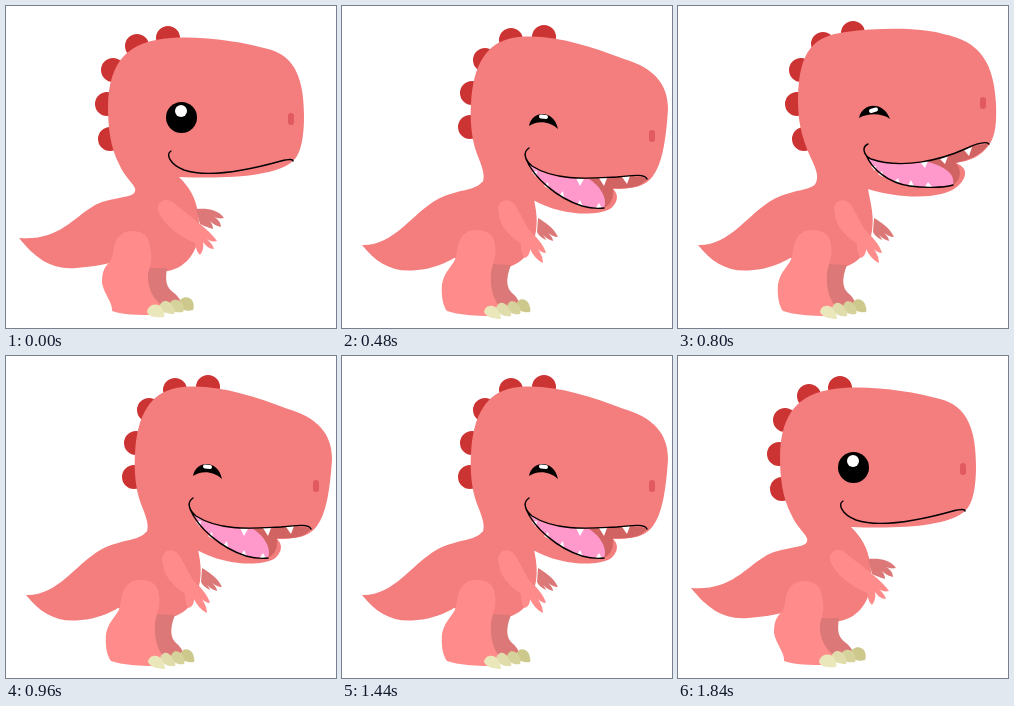
An HTML page that plays this animation: 330x322 px, repeating every 2 s.

```html
<!DOCTYPE html>
<html lang="en">
<head>
<meta charset="utf-8">
<title>Laughing dinosaur</title>
<style>
  html, body { margin: 0; width: 100%; height: 100%; overflow: hidden; background: #fff; }
  svg { display: block; width: 330px; height: 322px; }
  path { stroke-linecap: round; stroke-linejoin: round; }
</style>
</head>
<body>
<svg id="stage" viewBox="0 0 330 322"></svg>
<script>
const SKIN = '#f47d7d', LIGHT = '#ff8b8b', SHADE = '#dc7878';
const LOOP = 2000, STEP = 80, LAUGH_START = 400, LAUGH_END = 1680, BOB = 480, BOB_TOP = 720;

// calm: [resting, stretched]; laugh: [head high, head low]. A width of 0 means a filled shape.
const parts = [
  // back spikes
  { color: '#cc3333', width: 24,
    calm: ['M162,32h.01M131,40h.01M107,64h.01M101,98h.01M104,133h.01',
           'M162,28h.01M132,43h.01M115,72h.01M115,107h.01M126,140h.01'],
    laugh: ['M175,27h.01M145,38h.01M123,64h.01M119,98h.01M126,133h.01',
            'M202,31h.01M169,34h.01M143,54h.01M130,87h.01M128,121h.01'] },
  // head and neck
  { color: SKIN, width: 0,
    calm: ['M129,187C132,180 121,175 114,160C104,142 102,120 102,100C103,55 122,35 165,32C200,30 235,36 262,43C290,50 298,75 298,110C298,140 292,151 286,156C268,170 225,173 173,171C184,182 190,192 192,208L140,215Z',
           'M138,178C144,170 142,161 133,152C118,136 114,110 114,88C116,50 134,28 165,24C200,18 235,16 260,17C295,20 310,60 315,96C316,114 313,122 308,127C285,150 240,160 193,163C189,172 189,182 193,200L140,215Z'],
    laugh: ['M136,180C144,170 135,158 129,143C121,122 120,108 120,92C121,45 135,30 168,26C200,22 240,21 265,28C303,35 316,58 318,98C319,122 316,132 311,139C303,150 293,155 277,157C291,161 289,172 280,180C265,194 222,193 190,183C188,188 190,194 193,204L140,215Z',
            'M136,182C146,175 141,163 135,148C129,132 128,112 129,98C131,58 145,37 170,32C205,26 245,39 282,53C312,62 326,78 326,103C324,135 320,158 311,170C303,181 290,183 271,183C278,189 275,198 268,203C252,211 218,209 191,194C189,196 191,200 193,206L140,215Z'] },
  // body and tail
  { color: SKIN, width: 0,
    calm: ['M13,232C52,235 66,213 86,201C102,190 131,193 129,184L178,178C190,192 197,213 191,238C184,258 170,265 155,266L104,257C95,259 84,261 70,262C46,264 30,253 13,232Z',
           'M20,239C52,240 68,209 96,193C116,183 133,185 140,176L190,180C190,190 197,206 194,225C190,246 180,260 160,262L112,252C104,257 90,263 75,264C52,267 35,258 20,239Z'] },
  // far leg and its claws
  { color: SHADE, width: 0,
    calm: ['M140,262L161,262C159,275 160,281 168,287C174,292 176,297 176,301L152,304C144,292 140,278 140,262Z',
           'M147,258L169,259C163,274 165,282 170,287C176,292 178,297 178,301L154,304C147,292 147,274 147,258Z'] },
  { color: '#cdc98d', width: 0,
    calm: ['M172,298C174,290 184,289 187,296C188,299 188,302 187,304C181,306 174,304 172,298Z',
           'M174,299C176,291 184,292 187,298C188,301 189,304 188,306C182,307 176,305 174,299Z'] },
  { color: '#d6d29b', width: 0,
    calm: ['M163,300C164,292 174,292 177,299C178,302 178,304 177,306C171,307 165,306 163,300Z',
           'M165,301C166,293 174,294 177,300C179,303 179,306 178,308C172,309 167,307 165,301Z'] },
  // near leg and its claws
  { color: LIGHT, width: 0,
    calm: ['M108,240C111,229 118,225 126,225C137,225 143,231 144,240C147,253 145,258 142,267C141,282 147,292 155,299L150,309C132,309 116,309 106,305C107,297 98,288 96,277C96,267 98,261 103,257C107,252 107,246 108,240Z',
           'M116,239C119,228 126,224 134,224C146,224 152,229 153,239C155,250 151,256 149,266C148,282 151,292 157,300L150,310C134,310 116,309 105,305C101,300 99,290 100,278C102,268 107,263 111,257C115,252 114,246 116,239Z'] },
  { color: '#e0dcab', width: 0,
    calm: ['M153,301C156,292 164,294 168,302C169,304 169,306 168,308C161,308 155,306 153,301Z',
           'M154,302C157,294 164,296 167,303C169,306 170,308 169,310C162,311 156,308 154,302Z'] },
  { color: '#eae7bb', width: 0,
    calm: ['M141,306C142,298 152,296 156,302C158,305 159,308 158,311C151,312 143,311 141,306Z',
           'M142,306C143,298 153,298 156,304C158,307 159,310 159,313C152,313 144,311 142,306Z'] },
  // arms
  { color: SHADE, width: 0,
    calm: ['M190,203C200,202 212,203 218,212C214,213 211,212 208,211C212,213 215,217 215,221C210,220 207,218 204,215C206,218 207,220 207,223C201,221 198,220 194,218Z',
           'M196,212C203,216 212,222 216,231C212,231 209,229 206,227C209,230 211,232 211,235C207,234 204,232 201,229C202,231 204,232 204,234C200,232 197,230 195,226Z'] },
  { color: LIGHT, width: 0,
    calm: ['M153,207C148,196 160,190 168,197C178,206 188,212 194,218C201,224 207,229 211,235C207,236 204,235 201,233C204,236 207,239 208,243C203,243 200,240 197,236C198,241 197,245 194,249C190,245 190,241 189,237C172,230 158,218 153,207Z',
           'M157,209C153,196 165,189 173,199C180,210 182,216 187,224C196,232 202,240 204,247C200,247 196,244 194,240C198,246 201,251 201,257C195,254 191,249 188,243C188,247 187,250 183,252C179,247 179,243 179,238C165,228 158,219 157,209Z'] },
  // nostril
  { color: '#e05a60', width: 6,
    calm: ['M285,110L285,116', 'M298,78L299,84'],
    laugh: ['M305,94L305,100', 'M310,127L310,133'] },
  // open eye
  { color: '#000', width: 31, calm: ['M175.5,111.5h.01', 'M191,103.5h.01'], laugh: null },
  { color: '#fff', width: 12, calm: ['M175,105h.01', 'M189,97.5h.01'], laugh: null },
  // squinting eye
  { color: '#000', width: 0, calm: null,
    laugh: ['M181,112C184,97 205,94 212,113C204,107 190,107 181,112Z',
            'M187,120C190,104 212,103 216,123C208,115 195,114 187,120Z'] },
  { color: '#fff', width: 4, calm: null, laugh: ['M193,105L198,103.5', 'M199,110.5L204,111'] },
  // smile
  { color: '#000', width: 1.4, line: true,
    calm: ['M165,145C160,148 163,158 178,164C205,173 250,162 275,155C283,153 287,153 287,155',
           'M188,138C184,142 190,150 203,154C235,158 270,140 297,124C304,120 309,120 310,122'],
    laugh: null },
  // open mouth: throat, tongue, teeth, lips
  { color: '#d26363', width: 0, calm: null,
    laugh: ['M240,157C265,154 290,138 311,138C302,150 290,154 278,157C284,164 283,174 275,179Z',
            'M235,173C260,172 290,167 305,173C298,182 285,183 271,182C272,190 270,198 262,202Z'] },
  { color: '#ff99cc', width: 0, calm: null,
    laugh: ['M186,146C188,152 191,153 193,153C215,159 235,158 250,156C266,160 278,168 275,179C265,182 245,182 232,180C210,177 194,163 186,146Z',
            'M183,151C184,154 187,158 190,160C207,172 230,173 247,173C258,180 266,192 262,202C255,203 247,202 240,200C215,192 192,172 183,151Z'] },
  { color: '#fff', width: 0, calm: null,
    laugh: ['M242,156L250,155L247,162ZM262,153L270,150L267,158ZM286,144L294,141L291,150ZM193,160L197,165L198,160ZM200,168L205,171L204,165ZM216,176L222,178L220,172ZM230,180L236,180L233,174ZM247,181L254,181L250,176Z',
            'M234,172L242,173L238,180ZM257,172L265,172L262,180ZM280,171L288,170L285,178ZM190,166L194,171L195,165ZM202,180L207,183L206,176ZM217,190L222,192L221,185ZM235,199L241,201L238,194ZM253,203L260,202L257,197Z'] },
  { color: '#000', width: 1.4, line: true, calm: null,
    laugh: ['M190,138C183,141 186,150 193,153C225,164 265,153 287,143C300,137 308,135 311,138M188,149C194,163 210,177 232,180C245,182 265,182 275,179',
            'M187,142C181,146 182,153 190,160C215,176 250,172 275,171C292,169 303,168 305,173M184,153C192,172 215,192 240,200C247,202 255,203 262,202'] },
];

const stage = document.getElementById('stage');
for (const part of parts) {
  part.node = document.createElementNS('http://www.w3.org/2000/svg', 'path');
  part.node.setAttribute('fill', part.width ? 'none' : part.color);
  if (part.width) {
    part.node.setAttribute('stroke', part.color);
    part.node.setAttribute('stroke-width', part.width);
  }
  stage.append(part.node);
}

// Blend two path strings of the same structure, number by number.
function blend([from, to], k) {
  const ends = to.match(/[\d.]+/g);
  let i = 0;
  return from.replace(/[\d.]+/g, n => +(+n + (ends[i++] - n) * k).toFixed(2));
}

function draw(t) {
  const laughing = t >= LAUGH_START && t < LAUGH_END;
  const stretch = Math.min(1, Math.max(0, Math.min(t - 160, 1840 - t) / 160));
  const drop = (0.5 - Math.cos((t - BOB_TOP) / BOB * 2 * Math.PI)) / 1.5;
  for (const { node, calm, laugh } of parts) {
    const bobbing = laughing && laugh !== undefined;
    const poses = bobbing ? laugh : calm;
    node.setAttribute('d', poses ? blend(poses, bobbing ? drop : stretch) : '');
  }
}

let shown = -1;
function tick(now) {
  const t = Math.floor(now % LOOP / STEP) * STEP;
  if (t !== shown) draw(shown = t);
  requestAnimationFrame(tick);
}
draw(0);
requestAnimationFrame(tick);
</script>
</body>
</html>
```
